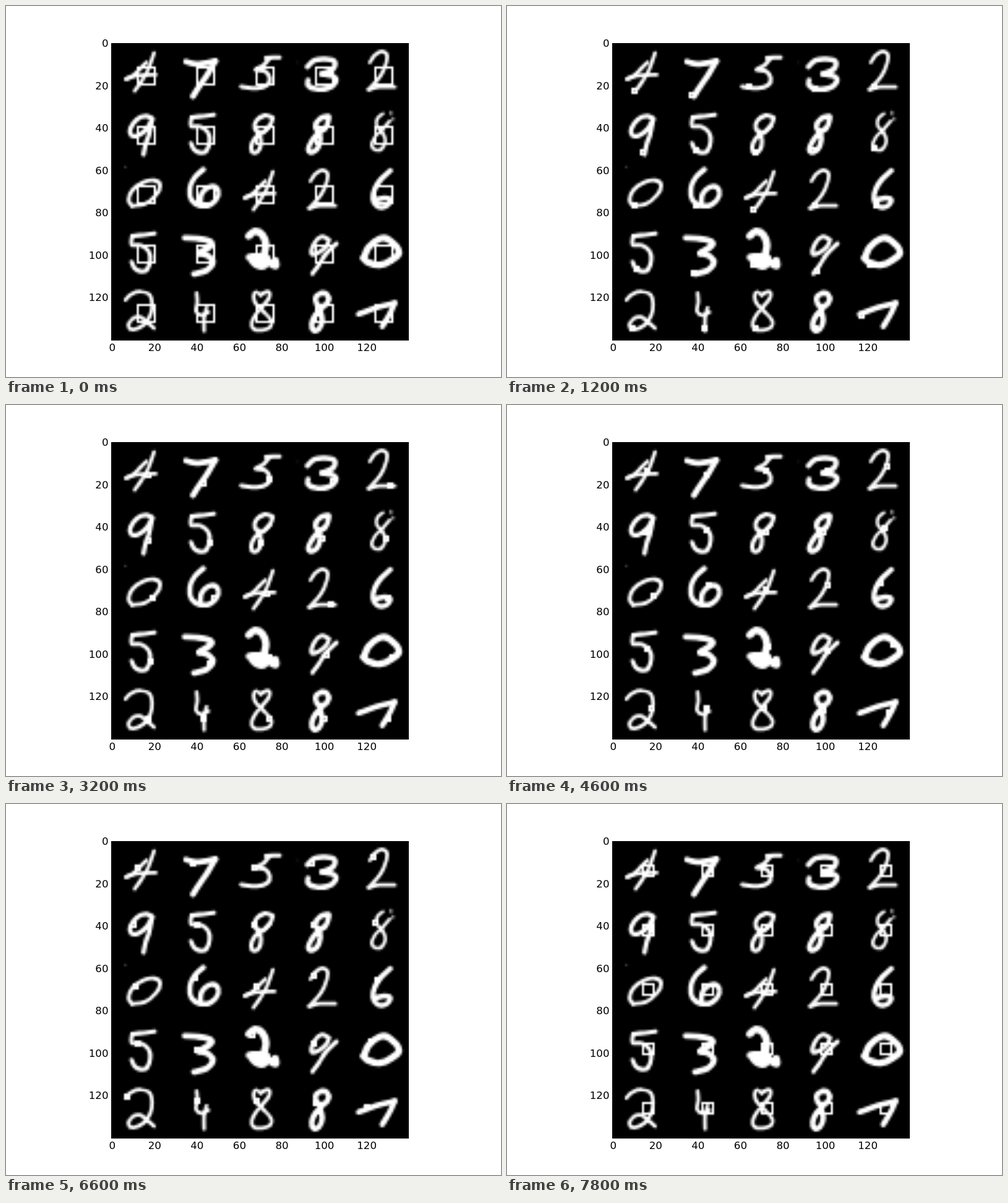
Animation of 800x600 px, one loop 8000 ms. Source, as an HTML page with a canvas:

```html
<!DOCTYPE html>
<html lang="en">
<head>
<meta charset="utf-8">
<title>Glimpses over digits</title>
<style>
  html, body { margin: 0; width: 100%; height: 100%; overflow: hidden; background: #fff; }
  svg, canvas { position: absolute; left: 0; top: 0; }
  canvas { left: 170px; top: 60px; }
  text { font: 16.67px "DejaVu Sans", sans-serif; fill: #000; }
  .x { text-anchor: middle; }
  .y { text-anchor: end; }
</style>
</head>
<body>
<svg id="axes" width="800" height="600"><rect x="170" y="60" width="481" height="481"/></svg>
<canvas id="plot" width="480" height="480"></canvas>
<script>
const STEP = 200, STEPS = 40;
const GRID = 140, CELL = 28, SIZE = 480, PX = SIZE / GRID;

// The glimpse leaves the cell centre, circles the digit along its ink and returns.
// Stops are [step, x, y] as fractions of the digit's extent.
const FIRST = { step: 0, x: 16.5, y: 15.1, size: 9 };
const STOPS = [[6, .2, .92], [10, .5, 1], [16, .8, .72], [23, .65, .45], [28, .65, .1], [33, .25, .3]];
const LAST = { step: 39, x: 16.6, y: 14, size: 6.4 };

const surface = () => {
  const c = document.createElement("canvas");
  c.width = c.height = GRID;
  return c.getContext("2d", { willReadFrequently: true });
};
const digits = surface(), scene = surface();
const plot = document.getElementById("plot").getContext("2d");
const cells = [];

digits.fillRect(0, 0, GRID, GRID);
digits.lineCap = digits.lineJoin = "round";

// Smooth curve through the given points
function curve(points) {
  const path = new Path2D();
  const at = i => points[Math.max(0, Math.min(points.length - 1, i))];
  path.moveTo(...at(0));
  for (let i = 0; i < points.length - 1; i++) {
    const [a, b, c, d] = [at(i - 1), at(i), at(i + 1), at(i + 2)];
    const bend = (p, from, to, sign) => p.map((v, k) => v + sign * (to[k] - from[k]) / 6);
    path.bezierCurveTo(...bend(b, a, c, 1), ...bend(c, b, d, -1), ...c);
  }
  return path;
}

// Pen strokes are separated by a slash, in screen pixels from the cell's corner.
function write(row, col, width, strokes, color = "#fff") {
  digits.setTransform(1 / PX, 0, 0, 1 / PX, col * CELL, row * CELL);
  digits.lineWidth = width;
  digits.strokeStyle = color;
  for (const s of strokes.split("/")) {
    digits.stroke(curve(s.trim().split(" ").map(p => p.split(",").map(Number))));
  }
}

function digit(row, col, width, strokes) {
  write(row, col, width, strokes);
  cells.push({ row, col, keys: route(row, col) });
}

function route(row, col) {
  const { data } = digits.getImageData(col * CELL, row * CELL, CELL, CELL);
  const ink = [];
  for (let i = 0; i < CELL * CELL; i++) {
    if (data[i * 4] > 170) ink.push([i % CELL + .5, Math.floor(i / CELL) + .5]);
  }
  const along = (axis, f) => {
    const values = ink.map(p => p[axis]);
    const min = Math.min(...values);
    return min + f * (Math.max(...values) - min);
  };
  const stops = STOPS.map(([step, u, v]) => {
    const tx = along(0, u), ty = along(1, v);
    const far = ([x, y]) => Math.hypot(x - tx, y - ty);
    const [x, y] = ink.reduce((best, p) => far(p) < far(best) ? p : best);
    return { step, x, y, size: 3 };
  });
  return [FIRST, ...stops, LAST];
}

const FOUR = "69,16 60,42 50,60 38,77 / 57,31 46,42 34,53 24,58 / 24,58 40,53 72,51";
const TWO = "34,31 42,19 54,13 62,22 56,44 45,61 32,75 / 32,75 50,71 74,71";
const FIVE = "70,20 52,22 34,24 / 34,24 33,38 48,39 60,48 63,62 58,78 48,81 38,76 33,66";

digit(0, 0, 6, FOUR);
digit(0, 1, 9.5, "25,30 42,34 72,29 / 72,29 60,50 46,70 36,86");
digit(0, 2, 7, "80,23 58,24 / 64,24 54,36 41,43 56,45 64,56 60,68 44,73 18,70");
digit(0, 3, 8.5, "29,38 40,28 58,26 73,30 70,42 52,50 / 52,50 72,54 74,64 62,73 42,74 30,68 30,60");
digit(0, 4, 6, TWO);

digit(1, 0, 7.5, "66,26 56,22 42,27 31,42 32,53 44,53 58,42 66,27 / 66,27 61,52 56,66 52,84");
digit(1, 1, 7, FIVE);
digit(1, 2, 7, "68,24 56,21 43,29 40,42 50,50 64,38 69,25 / 46,46 50,62 47,76 39,81 34,74 40,58 54,48 64,38");
digit(1, 3, 8.5, "63,22 50,26 42,38 48,47 60,38 64,24 / 48,46 50,60 44,76 33,80 32,70 44,52 58,42");
digit(1, 4, 5.5, "55,18 46,26 45,38 54,48 59,62 54,74 44,77 37,70 42,56 54,44 66,30");

digit(2, 0, 6.5, "34,72 28,62 34,46 52,33 70,30 79,38 72,54 54,68 34,71");
digit(2, 1, 8.5, "53,12 38,26 31,44 34,62 48,71 66,68 77,54 74,42 62,41 50,52 48,66");
digit(2, 2, 6, FOUR);
digit(2, 3, 6, TWO);
digit(2, 4, 8.5, "67,14 52,28 42,44 39,60 46,72 60,72 67,62 58,58 42,62");

digit(3, 0, 7, FIVE);
digit(3, 1, 10, "23,27 42,28 60,31 66,38 46,52 / 46,52 62,57 68,68 58,80 38,85");
digit(3, 2, 12, "30,24 40,16 52,22 58,38 55,54 / 31,58 58,58 56,71 44,71 34,60 50,64 / 58,62 73,72 73,63");
digit(3, 3, 7, "64,30 52,25 40,36 36,53 48,50 60,40 64,30 / 76,36 58,54 48,70 37,85");
digit(3, 4, 11, "24,60 32,42 50,28 66,31 81,50 70,62 50,71 32,67 23,59");

digit(4, 0, 6, "23,31 32,22 48,18 62,23 66,38 63,56 52,72 36,79 28,74 34,62 46,59 58,67 69,77");
digit(4, 1, 6, "42,20 43,34 41,50 50,56 61,51 / 58,44 54,60 54,81");
digit(4, 2, 6, "50,24 42,18 38,26 42,38 54,50 66,64 66,74 52,80 38,78 35,68 42,54 54,40 63,28 62,18 50,22");
digit(4, 3, 9, "52,20 43,26 44,38 54,42 63,32 60,22 52,20 / 54,42 42,56 36,70 39,80 48,78 53,64 50,50");
digit(4, 4, 9, "16,54 44,44 74,36 / 74,36 66,54 54,74");

// Faint specks
write(0, 3, 3, "13,31 13,31.1", "#333");
write(2, 0, 4, "23,8 23,8.1", "#555");
write(1, 4, 4, "68,15 68,19 / 71,25 71,28", "#aaa");

function spline(a, b, c, d, u) {
  return b + u / 2 * (c - a + u * (2 * a - 5 * b + 4 * c - d + u * (3 * (b - c) + d - a)));
}

function glimpse(keys, step) {
  const last = keys.length - 1;
  let i = 0;
  while (i < last - 1 && step >= keys[i + 1].step) i++;
  const [a, b, c, d] = [Math.max(0, i - 1), i, i + 1, Math.min(last, i + 2)].map(n => keys[n]);
  const u = (step - b.step) / (c.step - b.step);
  return ["x", "y", "size"].map(k => spline(a[k], b[k], c[k], d[k], u));
}

function draw(step) {
  scene.drawImage(digits.canvas, 0, 0);
  scene.strokeStyle = "#fff";
  for (const { row, col, keys } of cells) {
    const [x, y, size] = glimpse(keys, step);
    const n = Math.max(3, Math.round(size));
    const left = Math.round(x - n / 2) + col * CELL;
    const top = Math.round(y - n / 2) + row * CELL;
    scene.strokeRect(left + .5, top + .5, n - 1, n - 1);
  }
  plot.imageSmoothingQuality = "low";
  plot.drawImage(scene.canvas, 0, 0, SIZE, SIZE);
}

function label(cls, x, y, value) {
  const t = document.createElementNS("http://www.w3.org/2000/svg", "text");
  t.setAttribute("class", cls);
  t.setAttribute("x", x);
  t.setAttribute("y", Math.round(y));
  t.textContent = value;
  document.getElementById("axes").append(t);
}
for (let v = 0; v <= 120; v += 20) {
  label("x", 171.7 + v * PX, 558, v);
  label("y", 165.5, 66 + v * PX, v);
}

let shown = -1;
const begin = performance.now();
function tick() {
  const step = Math.floor((performance.now() - begin) / STEP) % STEPS;
  if (step !== shown) draw(shown = step);
  requestAnimationFrame(tick);
}
tick();
</script>
</body>
</html>
```
